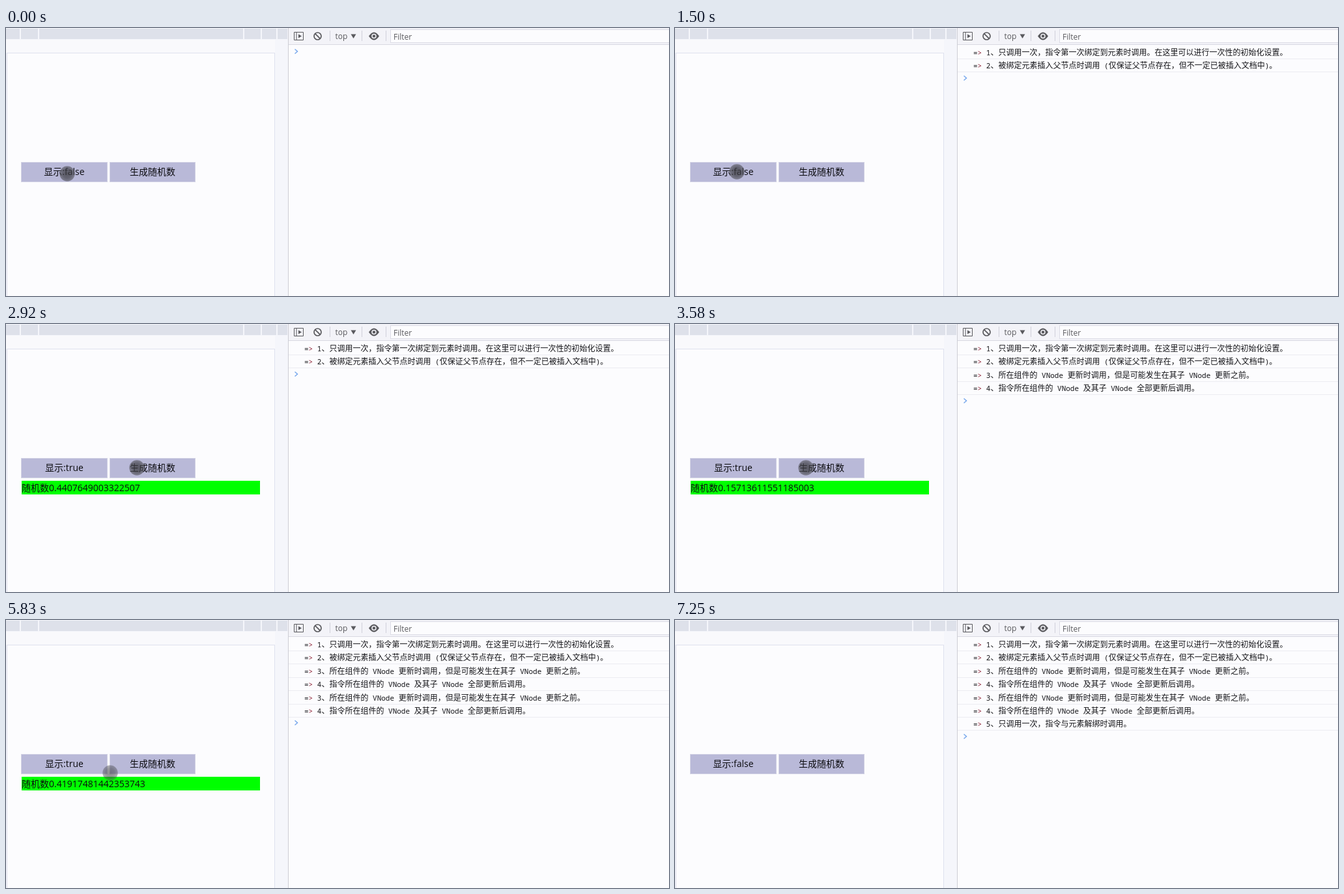
An HTML page for the animation above (7760 ms loop, 1018 by 412 pixels).

```html
<!DOCTYPE html>
<html lang="zh-CN">
<head>
<meta charset="utf-8">
<title>指令钩子演示</title>
<style>
  html, body { margin: 0; width: 100%; height: 100%; overflow: hidden; background: #fcfcfe; }
  svg { display: block; width: 1018px; height: 412px; }
  text { font: 14px "Open Sans", "Noto Sans CJK SC", "Noto Sans CJK", sans-serif; fill: #0c0c10; white-space: pre; text-spacing-trim: space-all; }
  .tool { font-size: 12px; fill: #5a5a5e; }
  .row text { font: 12px "Noto Sans CJK SC", "Noto Sans CJK", sans-serif; fill: #141418; }
  .row .latin { font: 11px "Noto Sans Mono", "DejaVu Sans Mono", monospace; }
  .row .tip { fill: #8c1c30; }
  .row line { stroke: #ececf2; }
  .tabs rect { fill: #dee1ea; }
  .button rect { fill: #b9b9d8; stroke: #d2d2e4; }
  .button text { text-anchor: middle; }
  .button.active rect { fill: #dcdce9; stroke: #e2e2ee; }
  .button.active text { fill: #77777c; }
  .icon { fill: none; stroke: #5a5a5e; }
  .icon .solid { fill: #5a5a5e; stroke: none; }
</style>
</head>
<body>
<svg viewBox="0 0 1018 412">
  <defs>
    <radialGradient id="spot">
      <stop offset="0" stop-color="#38383c" stop-opacity=".76"/>
      <stop offset=".6" stop-color="#404046" stop-opacity=".7"/>
      <stop offset="1" stop-color="#56565e" stop-opacity=".6"/>
    </radialGradient>
  </defs>

  <!-- page preview -->
  <rect width="433" height="412" fill="#f5f6fb"/>
  <rect y="18" width="413" height="20" fill="#f9f9fc"/>
  <g class="tabs">
    <rect y="1" width="21" height="16"/>
    <rect x="23" y="1" width="26" height="16"/>
    <rect x="51" y="1" width="313" height="16"/>
    <rect x="366" y="1" width="25" height="16"/>
    <rect x="393" y="1" width="22" height="16"/>
    <rect x="417" y="1" width="15" height="16"/>
  </g>
  <rect x="1.5" y="38.5" width="411" height="390" fill="#fcfcfe" stroke="#dfe1ee"/>
  <g class="button" id="toggle">
    <rect x="23.5" y="206.5" width="132" height="30"/>
    <text x="89.5" y="226"></text>
  </g>
  <g class="button" id="random">
    <rect x="159.5" y="206.5" width="131" height="30"/>
    <text x="225" y="226">生成随机数</text>
  </g>
  <g id="result">
    <rect x="24" y="241" width="366" height="21" fill="#0f0"/>
    <text x="24" y="257"></text>
  </g>

  <!-- console -->
  <path d="M433.5 0V412" stroke="#cdcdd4"/>
  <rect x="434" width="584" height="25" fill="#f3f3f8"/>
  <path d="M434 25.5H1018" stroke="#d8d8e2"/>
  <path d="M497.5 4V20M546.5 4V20M583.5 4V20" stroke="#d0d0da"/>
  <rect x="590.5" y="2.5" width="440" height="20" fill="#fcfcfe" stroke="#dcdce6"/>
  <g class="icon">
    <path d="M442.5 6.5h14v12h-14zM446 6.5v12"/>
    <path class="solid" d="M449 9.5v6l5-3z"/>
    <circle cx="478.5" cy="12.5" r="5.5" stroke-width="1.7"/>
    <path d="M474.6 8.6l7.8 7.8" stroke-width="1.7"/>
    <path class="solid" d="M529.5 9.5h8l-4 6.5z"/>
    <path class="solid" d="M557 12.5q8-12 16 0q-8 12-16 0z"/>
    <circle cx="565" cy="12.5" r="3" stroke="#f3f3f8" stroke-width="1.5"/>
  </g>
  <text class="tool" x="505.5" y="17">top</text>
  <text class="tool" x="595" y="18">Filter</text>
  <g id="log"></g>
  <path id="prompt" d="M443.5 -3.5l4 3.5l-4 3.5" fill="none" stroke="#78a8ec" stroke-width="1.5"/>

  <circle id="pointer" r="11.7" fill="url(#spot)"/>
</svg>
<script>
const LOOP = 7760, PITCH = 20.4;
const $ = id => document.getElementById(id);

const bind = ['1、只调用一次，指令第一次绑定到元素时调用。在这里可以进行一次性的初始化设置。',
              '2、被绑定元素插入父节点时调用 (仅保证父节点存在，但不一定已被插入文档中)。'];
const update = ['3、所在组件的 VNode 更新时调用，但是可能发生在其子 VNode 更新之前。',
                '4、指令所在组件的 VNode 及其子 VNode 全部更新后调用。'];
const messages = [...bind, ...update, ...update, '5、只调用一次，指令与元素解绑时调用。'];

const latin = s => s.replace(/[\x20-\x7e]+/g, '<tspan class="latin">$&</tspan>');
$('log').innerHTML = messages.map((message, i) => `
  <g class="row" transform="translate(0 ${Math.round(37 + i * PITCH)})">
    <text x="458" y="4.5"><tspan class="latin">=<tspan class="tip">&gt;</tspan> </tspan>${latin(message)}</text>
    <line x1="434" x2="1018" y1="10.5" y2="10.5"/>
  </g>`).join('');
const rows = [...$('log').children];

// Each track lists [start time, value]; a value holds until the next start.
const rowCount = [[0, 0], [1500, 2], [3170, 4], [5170, 6], [6500, 7]];
const number = [[0, ''], [1580, '0.4407649003322507'], [3170, '0.15713611551185003'],
                [5170, '0.41917481442353743'], [6500, '']];
const pressed = [[0, ''], [1580, 'toggle'], [1670, ''], [3170, 'random'], [3420, ''],
                 [5170, 'random'], [5330, ''], [6500, 'toggle'], [6670, '']];
const shade = [[0, 1], [2250, .75], [2920, 1], [5580, .75], [6080, 1], [7080, .75]];

const path = (start, end, points) =>
  points.map((p, i) => [start + (end - start) * i / (points.length - 1), p]);
const position = [
  [0, [94, 224]],
  ...path(250, 420, [[94, 223], [95, 222], [95, 221]]),
  ...path(2250, 2580, [[104, 225], [130, 231], [167, 230], [191, 224], [200, 221]]),
  [2920, [201, 221]],
  ...path(5580, 6080, [[204, 224], [200, 230], [184, 236], [160, 235], [136, 231], [121, 226], [115.5, 223]]),
  ...path(7080, 7250, [[300, 262], [667, 353], null])
];

const at = (track, t) => track.findLast(([start]) => start <= t)[1];

function draw(now) {
  const t = now % LOOP;
  const count = at(rowCount, t), value = at(number, t), active = at(pressed, t), spot = at(position, t);

  rows.forEach((row, i) => row.style.display = i < count ? '' : 'none');
  $('prompt').setAttribute('transform', `translate(0 ${Math.round(36 + count * PITCH)})`);

  for (const id of ['toggle', 'random']) $(id).classList.toggle('active', active === id);
  $('toggle').lastElementChild.textContent = `显示:${value !== ''}`;
  $('result').style.display = value ? '' : 'none';
  $('result').lastElementChild.textContent = '随机数' + value;

  $('pointer').style.display = spot ? '' : 'none';
  if (spot) $('pointer').setAttribute('transform', `translate(${spot})`);
  $('pointer').style.opacity = at(shade, t);
}

let origin;
function tick(now) {
  origin ??= now;
  draw(now - origin);
  requestAnimationFrame(tick);
}
draw(0);
requestAnimationFrame(tick);
</script>
</body>
</html>
```
